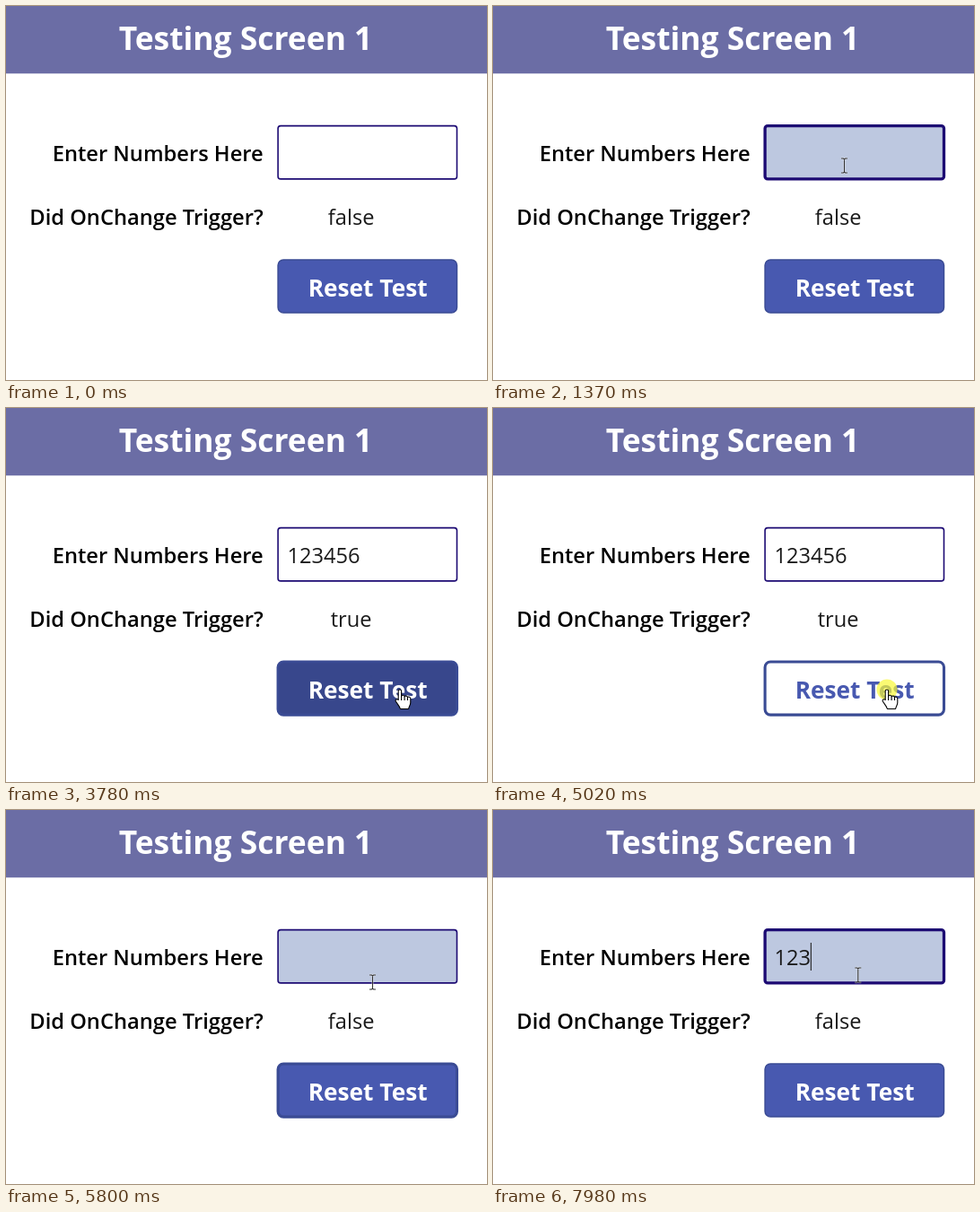
Recreate the animation shown at these times as an HTML page. Size 536 by 417 pixels, loop 8000 ms.

```html
<!DOCTYPE html>
<html lang="en">
<head>
<meta charset="utf-8">
<title>Testing Screen 1</title>
<style>
  html, body { margin: 0; width: 100%; height: 100%; overflow: hidden; background: #fff; }
  svg { display: block; width: 536px; height: 417px; }
  text { font-family: "Open Sans", "Noto Sans", sans-serif; white-space: pre; }
  .title { font-size: 35.4px; font-weight: 700; fill: #fff; text-anchor: middle; }
  .label { font-size: 23.7px; font-weight: 600; text-anchor: end; }
  .value { font-size: 23.65px; fill: #1a1a1a; }
  .mid { text-anchor: middle; }
  .button { font-size: 26.25px; font-weight: 700; text-anchor: middle; }
  #click { fill: #f8f838; opacity: .7; }
  #arrow, #hand { fill: #fff; stroke: #000; stroke-width: 1.1; stroke-linejoin: round; }
  #beam { fill: none; stroke: #fff; stroke-opacity: .45; stroke-width: 2.4; }
  #beam path + path { stroke: #333; stroke-opacity: 1; stroke-width: 1.1; }
</style>
</head>
<body>
<svg viewBox="0 0 536 417">
  <rect width="536" height="75.3" fill="#6b6da5"/>
  <text class="title" x="267" y="49">Testing Screen 1</text>
  <text class="label" x="286.7" y="173">Enter Numbers Here</text>
  <text class="label" x="286.7" y="244">Did OnChange Trigger?</text>
  <rect id="field" x="303.1" y="133.6" width="199.4" height="59.3" rx="3" stroke="#1c0a73"/>
  <text id="typed" class="value" x="313.5" y="173"></text>
  <rect id="caret" y="148" width="1.1" height="31" fill="#222"/>
  <text id="result" class="value mid" x="384.6" y="244"></text>
  <rect id="button" x="303.1" y="283" width="199.4" height="59.1" rx="6" stroke="#3a4b94"/>
  <text id="caption" class="button" x="403.2" y="324">Reset Test</text>
  <circle id="click" r="11.5"/>
  <g id="arrow"><path d="M0 0V17L4 13.2L6.7 19.4L9.4 18.2L6.8 12.2H12.2Z"/></g>
  <g id="hand">
    <path d="M-1.8 11.5V1.6C-1.8 -.6 1.6 -.6 1.6 1.6V7.2C2.2 5.8 5 6 5.1 7.8C5.8 6.6 8.3 6.9 8.5 8.6C9.4 7.5 11.8 8.1 11.8 10V14.5C11.8 17 10.2 18.3 9.6 21.5H.4C-.3 18.5 -3 16 -4.7 13C-5.6 11.2 -3.3 9.8 -1.8 11.5Z"/>
    <path d="M1.6 7V12M5.1 8V12M8.5 9V12" fill="none"/>
  </g>
  <g id="beam">
    <path d="M-3.5 -8H-1L0 -7L1 -8H3.5M0 -7V7M-3.5 8H-1L0 7L1 8H3.5"/>
    <path d="M-3.5 -8H-1L0 -7L1 -8H3.5M0 -7V7M-3.5 8H-1L0 7L1 8H3.5"/>
  </g>
</svg>
<script>
const LOOP = 8000, BLINK = 530, DIGIT = 13.5;
const $ = id => document.getElementById(id);
const set = (id, attrs) => { for (const k in attrs) $(id).setAttribute(k, attrs[k]); };
const show = (id, on) => set(id, { visibility: on ? 'visible' : 'hidden' });

// Each row: start time, then the values held until the next row.
const pointer = [
  [70, 402, 398], [140, 400, 340], [215, 396, 268], [290, 393, 208], [360, 391.5, 178],
  [3320, 393, 184], [3397, 401, 207], [3473, 413, 241], [3550, 424, 272],
  [3627, 432, 295], [3703, 437, 309], [3780, 439, 314],
  [5420, 438, 309], [5500, 434, 293], [5570, 427, 268], [5650, 418, 238],
  [5730, 411, 210], [5800, 408.5, 192], [5880, 406.8, 184]
];
const typing = [
  [0, ''], [1600, '1'], [1700, '12'], [1830, '123'], [2140, '1234'], [2220, '123456'],
  [5100, ''], [6960, '1'], [7130, '12'], [7300, '123'], [7915, '1234'], [7980, '123']
];
const focus = [[0, ''], [840, 'field'], [2770, 'button'], [6030, 'field']];
const results = [[0, 'false'], [2850, 'true'], [5100, 'false']];
const clicks = [[840, 900], [5020, 5100], [6030, 6110]];
const caretResets = [840, 6110, ...typing.slice(1).map(row => row[0])];

const at = (rows, t) => rows.filter(row => row[0] <= t).pop();
const inside = (x, y, top, bottom) => x > 302 && x < 504 && y > top && y < bottom;

function draw(t) {
  const [, x, y] = at(pointer, t) || [0, -50, -50];
  const overField = inside(x, y, 133, 194), overButton = inside(x, y, 282, 343);
  const focused = at(focus, t)[1], text = at(typing, t)[1];
  const clicked = clicks.some(([a, b]) => t >= a && t < b);
  const pressed = clicked && overButton;

  set('field', {
    fill: overField ? '#bdc8e0' : '#fff',
    'stroke-width': focused === 'field' ? 3.3 : 1.6
  });
  set('button', {
    fill: pressed ? '#fff' : overButton ? '#38478c' : '#4859b0',
    'stroke-width': focused === 'button' ? 3.1 : 1.5
  });
  set('caption', { fill: pressed ? '#4859b0' : '#fff' });
  $('typed').textContent = text;
  $('result').textContent = at(results, t)[1];

  const since = t - Math.max(0, ...caretResets.filter(r => r <= t));
  set('caret', { x: 313.3 + text.length * DIGIT });
  show('caret', focused === 'field' && Math.floor(since / BLINK) % 2 === 0);

  set('click', { cx: x, cy: y });
  show('click', clicked);
  const kind = overField ? 'beam' : overButton ? 'hand' : 'arrow';
  for (const id of ['beam', 'hand', 'arrow']) {
    set(id, { transform: `translate(${x} ${y})` });
    show(id, id === kind);
  }
}

const start = performance.now();
function tick() {
  draw((performance.now() - start) % LOOP);
  requestAnimationFrame(tick);
}
draw(0);
requestAnimationFrame(tick);
</script>
</body>
</html>
```
